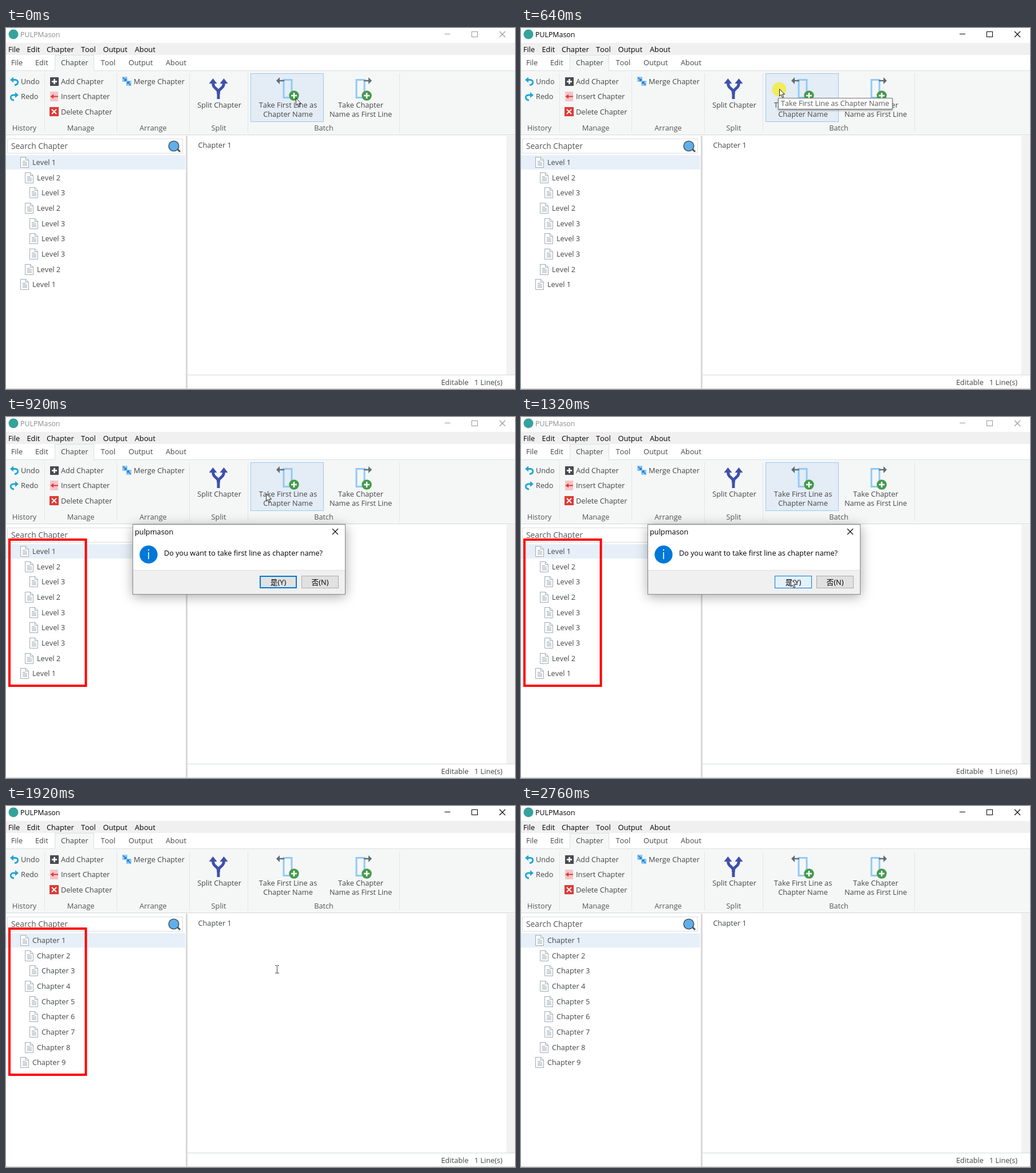
These frames come from a looping animation (889x630 px, 2.84 s). An HTML page with a canvas:

```html
<!DOCTYPE html>
<html lang="en">
<head>
<meta charset="utf-8">
<title>Chapter names</title>
<style>
html, body { margin: 0; width: 100%; height: 100%; overflow: hidden; background: #fff; }
canvas { display: block; width: 889px; height: 630px; }
</style>
</head>
<body>
<canvas id="stage" width="889" height="630"></canvas>
<script>
const W = 889, H = 630;
const LOOP = 2840, STEP = 40;
const FAMILY = '"Open Sans", "Noto Sans CJK SC", "Noto Sans CJK", sans-serif';
const INK = '#444746';
const LEVELS = [1, 2, 3, 2, 3, 3, 3, 2, 1];

const stage = document.getElementById('stage').getContext('2d');
// The dialog is painted on its own layer so that it fades as one piece.
const layer = document.createElement('canvas');
layer.width = W;
layer.height = H;
const layerCtx = layer.getContext('2d');
let ctx = stage;

const clamp = v => Math.max(0, Math.min(1, v));
const progress = (t, a, b) => clamp((t - a) / (b - a));
const ease = p => p * p * (3 - 2 * p);
const mix = (a, b, p) => a + (b - a) * p;

function rect(x, y, w, h, fill) {
  ctx.fillStyle = fill;
  ctx.fillRect(x, y, w, h);
}
function frame(x, y, w, h, color, width = 1) {
  ctx.strokeStyle = color;
  ctx.lineWidth = width;
  ctx.strokeRect(x + width / 2, y + width / 2, w - width, h - width);
}
function line(color, width, ...pts) {
  ctx.strokeStyle = color;
  ctx.lineWidth = width;
  ctx.beginPath();
  for (let i = 0; i < pts.length; i += 2) ctx.lineTo(pts[i], pts[i + 1]);
  ctx.stroke();
}
function poly(fill, ...pts) {
  ctx.fillStyle = fill;
  ctx.beginPath();
  for (let i = 0; i < pts.length; i += 2) ctx.lineTo(pts[i], pts[i + 1]);
  ctx.closePath();
  ctx.fill();
}
function disc(x, y, r, fill) {
  ctx.fillStyle = fill;
  ctx.beginPath();
  ctx.arc(x, y, r, 0, Math.PI * 2);
  ctx.fill();
}
// y is the middle of the capitals
function text(s, x, y, color = INK, align = 'left', size = 12.75) {
  ctx.font = `${size}px ${FAMILY}`;
  ctx.fontKerning = 'none';
  ctx.textAlign = align;
  ctx.fillStyle = color;
  ctx.fillText(s, x, y + size * 0.35);
}
function cross(x, y, r, color, width = 1.1) {
  line(color, width, x - r, y - r, x + r, y + r);
  line(color, width, x + r, y - r, x - r, y + r);
}
function plus(x, y, r, color, width) {
  line(color, width, x - r, y, x + r, y);
  line(color, width, x, y - r, x, y + r);
}
function shadowed(blur, dy, alpha, draw) {
  ctx.save();
  ctx.shadowColor = `rgba(0,0,0,${alpha})`;
  ctx.shadowBlur = blur;
  ctx.shadowOffsetY = dy;
  draw();
  ctx.restore();
}

function titleBar(active) {
  const ink = active ? '#000' : '#999';
  disc(13, 11, 8.5, '#35a29c');
  text('PULPMason', 25, 11.5, active ? '#000' : '#8c8c8c', 'left', 12.4);
  rect(766, 10, 10, 1, ink);
  frame(813, 6, 11, 10, ink);
  cross(867, 11, 5, ink);
}

function menus() {
  rect(0, 26, W, 21, '#f0f0f0');
  const names = ['File', 'Edit', 'Chapter', 'Tool', 'Output', 'About'];
  const menuX = [4, 36.5, 71, 131, 169.5, 225];
  const tabX = [9, 51, 96, 165.5, 214, 279];
  rect(0, 75, W, 111, '#f5f7f7');
  rect(0, 74, W, 1, '#dcdfe0');
  rect(85, 47, 69, 29, '#f5f7f7');
  rect(85, 47, 1, 28, '#dcdfe0');
  rect(153, 47, 1, 28, '#dcdfe0');
  rect(85, 47, 69, 1, '#dcdfe0');
  names.forEach((n, i) => {
    text(n, menuX[i], 37.5, '#000');
    text(n, tabX[i], 60.5);
  });
}

function turnArrow(x, y, dir) {
  ctx.save();
  ctx.translate(x, y);
  ctx.scale(dir, 1);
  poly('#20a5d6', -8, -2.5, -2, -7.5, -2, 2.5);
  ctx.strokeStyle = '#20a5d6';
  ctx.lineWidth = 2.8;
  ctx.beginPath();
  ctx.moveTo(-3, -2.5);
  ctx.lineTo(1, -2.5);
  ctx.bezierCurveTo(8, -2, 7, 6, 0, 6.5);
  ctx.stroke();
  ctx.restore();
}

function mergeIcon() {
  rect(203, 85, 9, 9, '#90caf9');
  rect(210, 92, 9, 9, '#90caf9');
  line('#1976c5', 1.6, 204.5, 86.5, 208, 90);
  line('#1976c5', 1.6, 217.5, 99.5, 214, 96);
  poly('#1976c5', 210.5, 92.5, 205.5, 92.5, 210.5, 87.5);
  poly('#1976c5', 211.5, 93.5, 216.5, 93.5, 211.5, 98.5);
}

function splitIcon() {
  const blue = '#3f51a9';
  line(blue, 5, 371, 111, 371, 124);
  for (const side of [-1, 1]) {
    const x = 371 + side * 9.5;
    ctx.beginPath();
    ctx.moveTo(x, 95);
    ctx.bezierCurveTo(x, 108, 371, 103, 371, 115);
    ctx.stroke();
    poly(blue, x - 7, 97, x, 88, x + 7, 97);
  }
}

function batchIcon(x, arrowX, dir) {
  frame(x, 89, 17, 34, '#90caf9', 3);
  line('#5f6e75', 2.4, arrowX, 92, arrowX + dir * 10, 92);
  poly('#5f6e75', arrowX + dir * 14, 92, arrowX + dir * 8, 86, arrowX + dir * 8, 98);
  disc(x + 19.5, 118, 8.7, '#439a4a');
  plus(x + 19.5, 118, 5, '#fff', 2.6);
}

function ribbon(hot) {
  rect(0, 186, W, 1, '#d3d6d7');
  for (const x of [67, 193, 320, 422, 687]) rect(x, 79, 1, 103, '#e2e5e6');
  [['History', 32], ['Manage', 130.5], ['Arrange', 257], ['Split', 371.5], ['Batch', 555]]
    .forEach(([s, x]) => text(s, x, 174.5, '#555', 'center'));

  turnArrow(15, 93, 1);
  text('Undo', 26, 93.5);
  turnArrow(14, 119.5, -1);
  text('Redo', 26, 119.5);

  rect(77, 86, 15, 15, '#454b50');
  plus(84.5, 93.5, 4.5, '#fff', 2.6);
  text('Add Chapter', 96, 93.5);
  rect(77, 111, 14, 17, '#f6c4c8');
  line('#d93c3c', 2, 80, 119.5, 91, 119.5);
  poly('#d93c3c', 77.5, 119.5, 83, 115.5, 83, 123.5);
  text('Insert Chapter', 96, 119.5);
  rect(76, 138, 16, 16, '#dc3b38');
  cross(84, 146, 4, '#fff', 1.8);
  text('Delete Chapter', 96, 146.5);

  mergeIcon();
  text('Merge Chapter', 223, 93.5);
  splitIcon();
  text('Split Chapter', 372.5, 135, INK, 'center');

  if (hot) {
    rect(427, 79, 128, 85, '#e4ecf5');
    frame(427, 79, 128, 85, '#9bcaf0');
  }
  batchIcon(483.5, 486, -1);
  text('Take First Line as', 492.5, 135, INK, 'center');
  text('Chapter Name', 492.5, 150.5, INK, 'center');
  batchIcon(610.5, 625, 1);
  text('Take Chapter', 619.5, 135, INK, 'center');
  text('Name as First Line', 619.5, 150.5, INK, 'center');
}

function pageIcon(x, y) {
  const edge = '#a3abb3';
  poly('#fcfdfe', x, y - 9, x + 10, y - 9, x + 15, y - 4, x + 15, y + 10, x, y + 10);
  line(edge, 1, x + .5, y - 8.5, x + 9.5, y - 8.5, x + 14.5, y - 3.5,
    x + 14.5, y + 9.5, x + .5, y + 9.5, x + .5, y - 9);
  line(edge, 1, x + 9.5, y - 8.5, x + 9.5, y - 3.5, x + 14.5, y - 3.5);
  for (let i = 0; i < 4; i++) rect(x + 4, y - 2 + i * 2.4, i ? 8 : 5, 1, '#9ba6b0');
}

function panels(renamed) {
  frame(2, 193, 307, 26, '#d9dcde');
  text('Search Chapter', 9, 206.5, '#555', 'left', 13.8);
  line('#46545e', 3, 299, 211, 304, 216);
  disc(293, 206, 9.6, '#46545e');
  disc(293, 206, 8, '#5fb0ea');

  rect(0, 222, 313, 25, '#e7f0f9');
  LEVELS.forEach((level, i) => {
    const y = Math.round(235 + i * 26.65), x = 17 + level * 8;
    pageIcon(x, y - 1);
    text(renamed ? `Chapter ${i + 1}` : `Level ${level}`, x + 21, y);
  });

  rect(314, 188, 3, 442, '#d9d9d9');
  rect(874, 188, 15, 417, '#f2f2f2');
  rect(317, 605, 572, 1, '#d5d8d9');
  rect(0, 629, W, 1, '#cfcfcf');
  text('Chapter 1', 335.5, 204.5);
  text('Editable', 760, 619);
  text('1 Line(s)', 818, 619);
}

function tooltip(alpha) {
  if (alpha <= 0) return;
  ctx.save();
  ctx.globalAlpha = alpha;
  shadowed(3, 2, .35, () => rect(449, 122, 200, 20, '#fff'));
  frame(449, 122, 200, 20, '#767676');
  text('Take First Line as Chapter Name', 454, 132, '#575757', 'left', 12.6);
  ctx.restore();
}

function button(x, label, fill, edge, width = 1) {
  rect(x, 277, 65, 22, fill);
  frame(x, 277, 65, 22, edge, width);
  text(label, x + 32.5, 288.5, '#000', 'center');
}

function dialogBody(t) {
  shadowed(20, 4, .35, () => rect(222, 187, 371, 122, '#fff'));
  rect(222, 267, 371, 42, '#f0f0f0');
  rect(222, 267, 371, 1, '#dfdfdf');
  frame(221, 187, 372, 123, '#858585');
  text('pulpmason', 225, 200.5, '#000');
  if (t < 1760) cross(575, 200, 5, '#000');
  disc(249, 240, 15.7, '#0078d7');
  rect(248.2, 236, 1.6, 12, '#fff');
  rect(248, 231, 2, 2, '#fff');
  text('Do you want to take first line as chapter name?', 276, 237.5, '#000', 'left', 12.68);

  const hover = progress(t, 1160, 1320);
  const [r, g, b] = [229, 241, 251].map(v => Math.round(mix(225, v, hover)));
  if (t >= 1680) button(443, '是(Y)', '#cce4f7', '#005499');
  else button(443, '是(Y)', `rgb(${r},${g},${b})`, '#0078d7', hover < .5 ? 2 : 1);
  button(516, '否(N)', '#e1e1e1', '#adadad');
}

function dialog(t) {
  const p = progress(t, 680, 825) * (1 - progress(t, 1800, 1920));
  if (p <= 0) return;
  ctx = layerCtx;
  ctx.clearRect(0, 0, W, H);
  dialogBody(t);
  ctx = stage;
  const k = mix(.951, 1, p);
  ctx.save();
  ctx.globalAlpha = p;
  ctx.translate(407, 248);
  ctx.scale(k, k);
  ctx.drawImage(layer, -407, -248);
  ctx.restore();
}

function arrow(x, y) {
  ctx.save();
  ctx.translate(x, y);
  ctx.beginPath();
  for (const [px, py] of [[.5, .5], [.5, 13], [3.4, 10.3], [5.6, 15.5], [7.7, 14.6], [5.5, 9.6], [9.5, 9.6]])
    ctx.lineTo(px, py);
  ctx.closePath();
  ctx.fillStyle = '#fff';
  ctx.strokeStyle = '#222';
  ctx.lineWidth = 1;
  ctx.fill();
  ctx.stroke();
  ctx.restore();
}

function beam(x, y) {
  const ink = '#4a4a4a';
  rect(x, y - 6, 1, 13, ink);
  for (const dy of [-7, 6]) {
    rect(x - 3, y + dy, 3, 1, ink);
    rect(x + 1, y + dy, 3, 1, ink);
  }
}

function pointer(t) {
  if (t < 1760) {
    const a = progress(t, 0, 80), b = ease(progress(t, 840, 1160));
    const x = mix(mix(506, 451, a), 471, b), y = mix(mix(122, 106, a), 283, b);
    const click = (t >= 640 && t < 720) || t >= 1680;
    if (click) disc(x, y + 1, 12.3, 'rgba(242,236,62,.85)');
    arrow(x, y);
  } else if (t < 2760) {
    const p = ease(progress(t, 2280, 2760));
    const x = Math.round(mix(473, 858, p)), y = Math.round(mix(285, 636, p));
    if (y < 605) beam(x, y);
    else arrow(x, y);
  }
}

function scene(t) {
  rect(0, 0, W, H, '#fff');
  const done = t >= 1760;
  titleBar(done || (t >= 640 && t < 720));
  menus();
  ribbon(!done);
  panels(done);
  if (t < 800) tooltip(progress(t, 240, 360) * (1 - .95 * progress(t, 640, 760)));
  if (t >= 720 && t < 2080) frame(4, 212, 137.5, 259, '#f00', 4);
  dialog(t);
  pointer(t);
}

const start = performance.now();
function tick(now) {
  const t = Math.max(0, now - start) % LOOP;
  scene(Math.floor(t / STEP) * STEP);
  requestAnimationFrame(tick);
}
requestAnimationFrame(tick);
</script>
</body>
</html>
```
